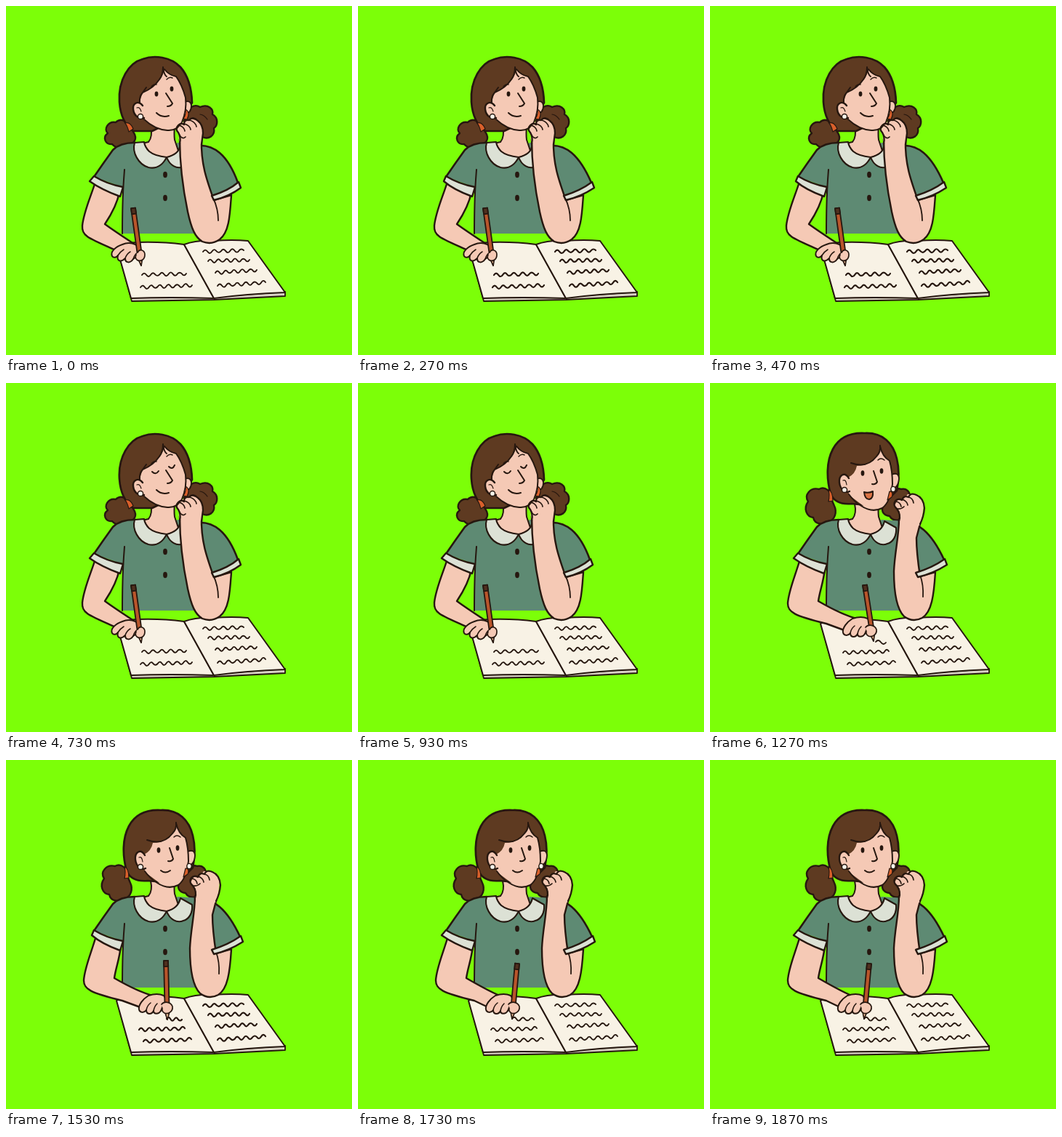
These frames come from a looping animation (476x480 px, 1990 ms). An HTML page:

```html
<!DOCTYPE html>
<html lang="en">
<head>
<meta charset="utf-8">
<title>Girl thinking and writing</title>
<style>
  html, body { margin: 0; width: 100%; height: 100%; overflow: hidden; background: #7cff08; }
  svg { display: block; width: 100%; height: 100%; }
</style>
</head>
<body>
<svg id="stage" viewBox="0 0 476 480"></svg>
<script>
const INK = '#26170f', SKIN = '#f5c9b5', HAIR = '#5e3a21', SHIRT = '#5e8a73',
      CLOTH = '#dce1d5', PAGE = '#f8f2e5', ORANGE = '#d9602b', WOOD = '#b9552b';
const LOOP = 1990;

// Eight drawings, four a second, each held until the next start time.
// "wobble" alternates the line work.
const drawings = [
  { start: 0, wobble: 0 },
  { start: 265, wobble: 1 },
  { start: 530, wobble: 0 },
  { start: 730, wobble: 0, blink: true },
  { start: 1000, wobble: 1, writes: true, talks: true, hand: [14, 5], top: [210, 281], tip: [242, 357] },
  { start: 1265, wobble: 0, writes: true, talks: true, hand: [0, 0], top: [213, 278], tip: [225, 355], ink: 228 },
  { start: 1530, wobble: 1, writes: true, hand: [0, 0], top: [220, 276], tip: [222, 357], ink: 221 },
  { start: 1730, wobble: 0, writes: true, hand: [-7, 0], top: [219, 280], tip: [212, 356], ink: 212 }
];

const shape = (d, fill, width = 2.4) =>
  `<path d="${d}" fill="${fill}" stroke="${INK}" stroke-width="${width}"/>`;
const line = (d, width = 1.8) => shape(d, 'none', width);
const dot = (x, y, rx, ry, fill = INK, width = 0) =>
  `<ellipse cx="${x}" cy="${y}" rx="${rx}" ry="${ry}" fill="${fill}" stroke="${INK}" stroke-width="${width}"/>`;
const move = ([x, y], content) => `<g transform="translate(${x} ${y})">${content}</g>`;

// Outer tips of the two sleeves.
const leftTip = ({ wobble }) => wobble ? 118 : 115;
const rightTip = ({ wobble, writes }) => writes ? 326 : wobble ? 325 : 323;

function squiggle(x1, y1, x2, y2, width) {
  const n = Math.max(2, Math.round((x2 - x1) / 6));
  let d = `M${x1} ${y1}`;
  for (let i = 0; i < n; i++) {
    const x = x1 + (x2 - x1) * (i + .5) / n, y = y1 + (y2 - y1) * (i + .5) / n;
    const bump = (i % 2 ? 4.6 : -4.6) * (i % 5 === 3 ? .7 : 1);
    d += `Q${x} ${y + bump} ${x1 + (x2 - x1) * (i + 1) / n} ${y1 + (y2 - y1) * (i + 1) / n}`;
  }
  return line(d, width);
}

function notebook({ wobble, writes, ink }) {
  const w = wobble ? 2.2 : 1.9;
  const left = writes ? [[183, 371, 246, 369], [189, 387, 255, 384]]
                      : [[187, 370, 248, 368], [185, 387, 256, 384]];
  const right = [[271, 338, 327, 336], [278, 351, 335, 349], [288, 367, 345, 363], [291, 385, 357, 380]];
  return shape('M153 333L173 406L286 404L384 399L384 393L286 400Z', '#d9d2c5', 1.8) +
    shape('M152 331Q160 326 182 325Q215 324 245 328L286 402Q225 400 172 402Z', PAGE, 2) +
    shape('M245 328Q262 322 285 323Q312 321 333 323L384 394Q330 396 286 402Z', PAGE, 2) +
    [...left, ...right].map(s => squiggle(...s, w)).join('') +
    (ink ? squiggle(ink, 356, 242, 357, w) : '');
}

function leftArm(pose) {
  const end = pose.writes && 195 + pose.hand[0];
  const arm = pose.writes
    ? `M124 242C117 266 108 286 107 303C107 315 115 320 160 331L${end - 5} 342L${end + 7} 324Q182 319 149 300C151 286 156 274 158 256Z`
    : 'M123 242C116 264 107 283 105 302C104 316 112 319 149 335L168 343L182 331C170 323 154 313 136 300C144 288 153 272 156 256Z';
  return shape(arm, SKIN) +
    shape(`M121 234Q139 245 161 249L157 262Q132 253 ${leftTip(pose)} 241Z`, CLOTH);
}

function pencil([x1, y1], [x2, y2]) {
  const length = Math.hypot(x2 - x1, y2 - y1);
  const angle = Math.atan2(y2 - y1, x2 - x1) * 180 / Math.PI - 90;
  return `<g transform="translate(${x1} ${y1}) rotate(${angle})">` +
    shape(`M-3 0H3L3 ${length - 10}L0 ${length}L-3 ${length - 10}Z`, WOOD, 1.8) +
    shape('M-3 0H3V8H-3Z', '#50301f', 1.8) +
    shape(`M-2.4 ${length - 9}H2.4L0 ${length}Z`, '#e7b993', 1) +
    dot(0, length - 1.5, 1, 2) + '</g>';
}

function writingHand({ writes, hand = [0, 0], top = [175, 278], tip = [186, 357] }) {
  const back = writes
    ? shape('M196 324C188 329 182 337 183 343C184 348 190 348 193 344C193 350 200 351 203 345C203 350 210 350 213 345L218 340Q222 329 217 324Q208 320 196 324Z', SKIN, 2) +
      line('M193 344Q194 338 199 334M203 345Q204 339 208 335M213 345Q215 340 216 336', 1.6)
    : shape('M160 328C151 331 143 338 146 344C148 347 152 346 154 343C152 351 158 353 164 347C164 354 171 354 175 348L184 342Q186 334 178 328Q169 324 160 328Z', SKIN, 2) +
      line('M154 343Q157 338 162 335M164 347Q166 341 171 338M175 348Q177 342 180 340', 1.6);
  const thumb = writes
    ? shape('M214 336C218 331 227 333 229 339C230 346 223 350 218 348Q214 346 215 341', SKIN, 1.7)
    : shape('M181 339C184 333 191 336 191 342C191 350 184 352 180 349Q177 346 179 342', SKIN, 1.7);
  return move(hand, back) + pencil(top, tip) + move(hand, thumb);
}

function torso(pose) {
  const r = rightTip(pose);
  const collarEnd = pose.writes
    ? 'C225 219 235 225 244 221C252 219 257 210 256 199L240 190'
    : 'C225 219 235 225 244 221C247 217 246 207 245 199L239 194';
  return `<path d="M177 188Q157 188 147 198Q134 216 121 235L160 249V313H262L286 263L${r - 4} 243Q309 215 294 202Q280 192 268 190L236 188L214 208Z" fill="${SHIRT}"/>` +
    shape('M199 166Q202 180 196 187L183 190L213 212L238 202L232 184Q231 176 232 164Z', SKIN, 2) +
    line(`M177 188Q157 188 147 198Q134 216 121 235M268 192Q282 192 294 202Q309 215 ${r - 4} 243`, 2.6) +
    line('M162 239Q160 268 160 313M162 239L163 225', 2) +
    shape('M177 188C173 201 182 218 196 222C209 225 217 216 221 208C212 207 203 205 197 200Q191 194 190 187Z', CLOTH, 2.1) +
    shape(`M221 208${collarEnd}Q237 204 221 208Z`, CLOTH, 2.1) +
    dot(219, 232, 2.9, 4.2) + dot(219, 264, 2.9, 4.2);
}

function rightArm(pose) {
  const r = rightTip(pose);
  const cuff = shape(`M283 261Q306 254 ${r - 3} 242L${r} 250Q307 262 286 267Z`, CLOTH);
  const arm = pose.writes
    ? shape('M260 187C260 210 254 234 253 259C253 288 257 311 267 321Q279 330 292 323C305 315 308 292 310 260L289 266Q284 233 284 213L290 190Z', SKIN) +
      line('M289 264Q294 278 293 294')
    : shape('M239 183C239 214 244 254 250 283C255 306 260 318 270 324Q283 329 294 321C307 311 308 288 310 260L286 267C276 239 268 217 269 184Z', SKIN) +
      line('M285 264Q292 279 292 295');
  const fist = pose.writes
    ? `<path d="M260 190Q263 180 259 174L254 168L259 160L266 160L272 153L287 154L294 167L292 184L288 196Z" fill="${SKIN}"/>` +
      line('M260 190Q263 181 257 173Q251 168 255 162Q259 158 264 161Q266 154 273 157Q276 150 284 154Q294 158 295 172Q294 184 289 194', 2.3) +
      line('M256 163Q262 164 263 170M264 160Q271 162 272 168M273 157Q279 158 280 165M257 173Q263 174 267 170', 1.7)
    : `<path d="M239 188L235 170L243 160L254 155L264 158L271 169L269 190Z" fill="${SKIN}"/>` +
      dot(236, 179, 2, 3, '#7cff08') +
      line('M239 189Q241 181 237 174Q232 169 237 164Q241 160 245 163Q245 156 252 157Q257 151 264 158Q271 163 271 175L269 190', 2.3) +
      line('M238 164Q245 166 246 172M245 162Q253 164 254 170M253 157Q261 160 262 166M237 174Q242 185 247 180', 1.7);
  return arm + cuff + fist;
}

function buns({ writes }) {
  return writes
    ? shape('M168 162C168 147 157 142 150 146C138 143 129 154 135 163C128 173 133 184 142 185C144 195 157 196 163 190C172 189 175 177 171 169Z', HAIR) +
      shape('M242 160C247 149 255 143 263 146C271 144 276 151 275 158L263 188Q252 191 247 183C237 182 235 174 239 169Z', HAIR)
    : shape('M174 170C167 156 157 154 151 160C140 158 134 170 140 175C132 181 137 191 146 190C152 197 162 196 165 191C176 191 182 183 175 173Z', HAIR) +
      shape('M247 153C249 140 259 134 267 139C278 134 286 142 284 149C293 154 291 165 286 168C288 179 278 184 270 180L252 173C245 169 243 160 247 153Z', HAIR) +
      line('M267 149Q273 150 277 156', 1.2);
}

function thinkingHead({ blink }) {
  const eyes = blink
    ? line('M201 122Q206 127 210 121M224 115Q229 120 232 113', 2)
    : dot(207, 121, 2.4, 3.4) + dot(228, 114, 2.4, 3.4);
  return shape('M175 172Q158 160 156 132C154 102 169 78 188 73C204 67 227 70 240 84Q255 101 256 133L245 151L201 172Z', HAIR, 2.7) +
    shape('M246 132Q254 129 255 137Q255 148 245 148Z', SKIN, 1.8) +
    `<path d="M188 119Q203 113 211 101Q216 96 218 88Q223 95 234 97Q242 108 247 126Q249 144 242 160Q236 172 222 171Q204 169 190 157L183 134Z" fill="${SKIN}"/>` +
    line('M190 156Q205 170 222 171Q236 172 242 160Q249 144 247 126Q242 108 234 97Q224 95 218 87', 2) +
    line('M188 119Q203 113 211 101Q216 95 216 84Q217 94 221 97M188 119L193 112M188 119Q183 125 184 133', 2) +
    shape('M188 137C182 129 174 134 175 142C176 151 183 156 190 154', SKIN) +
    line('M180 140Q184 138 186 145', 1.2) +
    dot(185, 152, 3.6, 3.6, '#f4f2ea', 1.5) + dot(248, 149, 2.5, 4, '#f4f2ea', 1.2) +
    line('M200 111Q203 107 207 108M221 101Q225 97 229 99', 1.5) + eyes +
    line('M220 120L229 134Q227 138 222 138', 2) +
    line('M207 147Q214 154 224 151', 2) +
    shape('M164 161Q171 159 175 169L169 173Q167 165 164 161Z', ORANGE, 1.2) +
    shape('M247 142Q254 146 249 156L244 155Q248 149 247 142Z', ORANGE, 1.2);
}

function writingHead({ talks }) {
  const mouth = talks
    ? shape('M212 150Q218 152 224 149Q225 159 219 160Q213 160 212 150Z', '#d97345', 2)
    : line('M213 152Q219 157 226 152', 2);
  return shape('M195 166Q173 168 166 153C160 131 160 108 169 91C178 74 194 68 213 69C238 68 252 83 257 104Q262 124 257 148L235 170Z', HAIR, 2.7) +
    shape('M250 126Q259 122 260 131Q259 145 250 145Z', SKIN, 1.8) +
    `<path d="M202 114Q219 114 229 101Q234 96 234 88Q239 101 247 107Q251 121 251 139Q248 164 237 172Q223 179 207 166L191 154L190 130Q200 125 202 114Z" fill="${SKIN}"/>` +
    line('M191 153Q198 163 208 169Q223 179 237 172Q248 164 251 139Q251 121 247 107Q237 101 234 87', 2) +
    line('M194 110Q216 118 229 101Q235 95 234 86', 2) +
    shape('M191 131C185 121 177 127 178 137C179 146 186 152 192 149', SKIN) +
    line('M183 134Q187 132 188 140', 1.2) +
    dot(185, 147, 3.6, 3.6, '#f4f2ea', 1.5) + dot(252, 146, 3.2, 3.6, '#f4f2ea', 1.4) +
    line('M231 106Q235 102 240 106', 1.5) +
    dot(210, 124, 2.4, 3.7) + dot(236, 121, 2.4, 3.7) +
    line('M225 121L230 136Q228 140 223 139', 2) + mouth +
    shape('M163 147Q169 149 169 162L163 163Q165 154 163 147Z', ORANGE, 1.2) +
    shape('M247 149Q253 149 250 157L244 161Z', ORANGE, 1.2);
}

const paint = pose =>
  '<g stroke-linecap="round" stroke-linejoin="round">' +
  buns(pose) + torso(pose) +
  (pose.writes ? writingHead(pose) : thinkingHead(pose)) +
  notebook(pose) + leftArm(pose) + rightArm(pose) + writingHand(pose) + '</g>';

const stage = document.getElementById('stage');
const pictures = drawings.map(paint);
let shown = -1;

function update(now) {
  const time = now % LOOP;
  const index = drawings.findLastIndex(d => d.start <= time);
  if (index !== shown) stage.innerHTML = pictures[shown = index];
}

const begin = performance.now();
function tick() {
  update(performance.now() - begin);
  requestAnimationFrame(tick);
}
tick();
</script>
</body>
</html>
```
